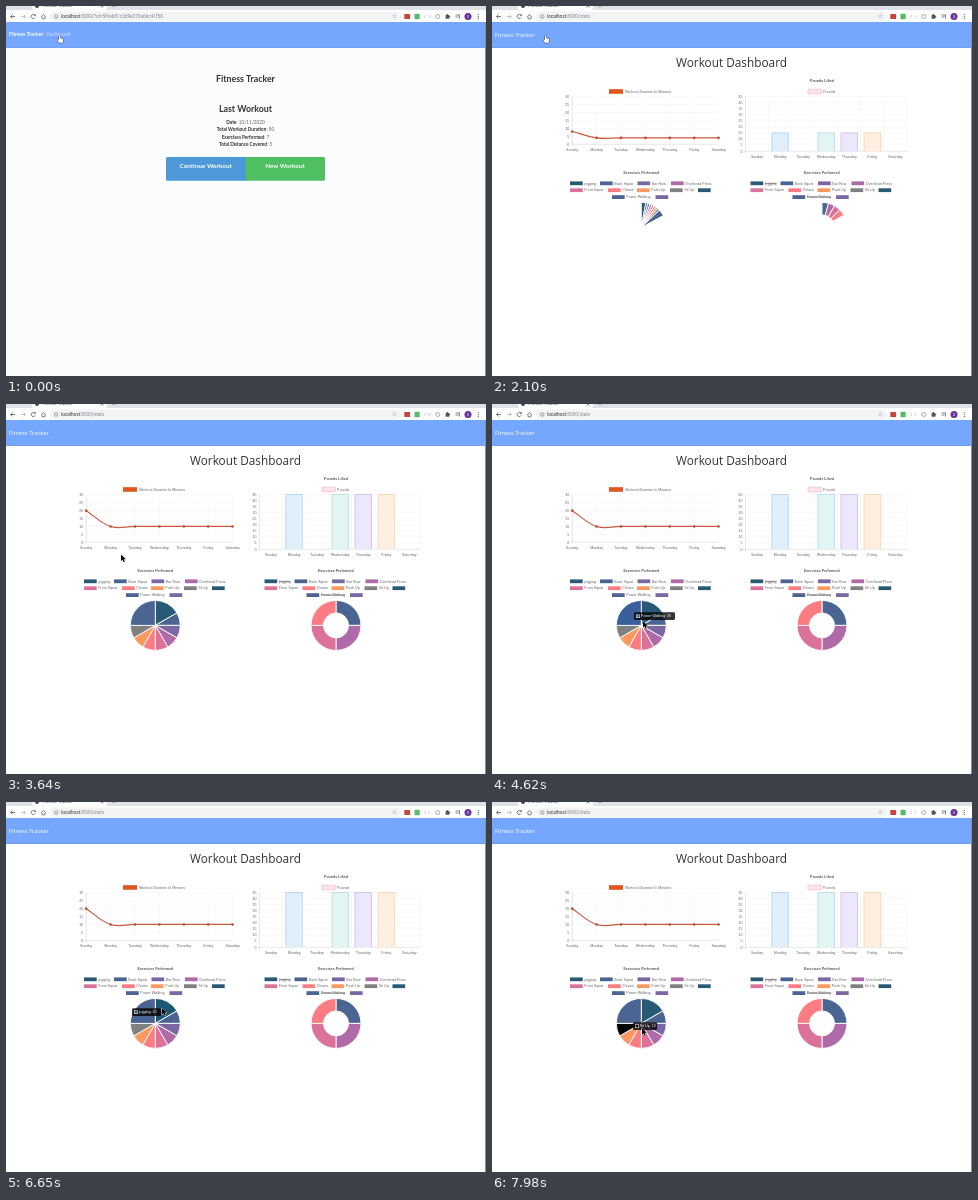
Recreate the animation shown at these times as an HTML page with a canvas. Size 480 by 370 pixels, loop 8 s.

```html
<!DOCTYPE html>
<html lang="en">
<head>
<meta charset="utf-8">
<title>Workout Dashboard</title>
<style>
  html, body { margin: 0; width: 100%; height: 100%; overflow: hidden; background: #fff; }
  canvas { display: block; width: 480px; height: 370px; }
</style>
</head>
<body>
<canvas id="stage" width="480" height="370"></canvas>
<script>
const ctx = document.getElementById('stage').getContext('2d');
const LOOP = 8000, DASHBOARD_AT = 2100, TAU = Math.PI * 2;
const LATO = 'Lato, sans-serif', SANS = '"Liberation Sans", Arial, sans-serif';
const OPEN = '"Open Sans", sans-serif', ROBOTO = 'Roboto, sans-serif';
const DAYS = ['Sunday', 'Monday', 'Tuesday', 'Wednesday', 'Thursday', 'Friday', 'Saturday'];
const [TEAL, BLUE, PURPLE, MAUVE, PINK, SALMON, ORANGE, GRAY] =
  ['#285a76', '#4b6592', '#7a67a3', '#af6ba8', '#dc7199', '#fb7d83', '#fd985f', '#808080'];

// Legend entries: label, colour, x, row
const LEGEND = [
  ['jogging', TEAL, 78, 0], ['Back Squat', BLUE, 108, 0], ['Bar Row', PURPLE, 145.5, 0],
  ['Overhead Press', MAUVE, 179, 0], ['Front Squat', PINK, 78, 1], ['Cleans', SALMON, 116, 1],
  ['Push Up', ORANGE, 145, 1], ['Sit Up', GRAY, 178, 1], ['', TEAL, 206, 1],
  ['Power Walking', BLUE, 120, 2], ['', PURPLE, 163.5, 2],
];
const PIE = [
  ['jogging', 20, TEAL, '#1d5873'], ['Back Squat', 10, BLUE], ['Bar Row', 10, PURPLE],
  ['Overhead Press', 10, MAUVE], ['Front Squat', 10, PINK], ['Cleans', 10, SALMON],
  ['Push Up', 10, ORANGE], ['Sit Up', 10, GRAY, '#000'], ['Power Walking', 30, BLUE, '#3b5f9b'],
];
const RING = [BLUE, MAUVE, PINK, SALMON].map(c => ['', 1, c]);
const BARS = [
  [1, '#dfeefb', '#9fcdf0'], [3, '#e1f3f5', '#a6dadb'],
  [4, '#ece5fb', '#c5b3ef'], [5, '#feeede', '#fbcd9d'],
];
// Pointer path: time, x, y
const POINTER = [
  [0, 54, 29], [2870, 54, 29], [3290, 95, 110], [4200, 147, 215], [4620, 151, 217],
  [4800, 151, 217], [5100, 156, 206], [6900, 156, 206], [7270, 146, 221],
  [7420, 146, 221], [7720, 150, 226], [8000, 150, 226],
];
// Hovered pie slice and where its tooltip rests: time, slice, x, y, width
const HOVERS = [
  [4200, 8, 142, 208.3, 41], [4900, 0, 126, 206.3, 29],
  [7278, 8, 142, 208.3, 41], [7700, 7, 141, 220.3, 24],
];

const lerp = (a, b, p) => a + (b - a) * p;
const easeOut = (t, start, length = 1000) =>
  1 - (1 - Math.min(1, Math.max(0, (t - start) / length))) ** 4;

function text(str, x, y, size, color, family = SANS, align = 'left', weight = 400) {
  ctx.font = `${weight} ${size}px ${family}`;
  ctx.textAlign = align;
  ctx.fillStyle = color;
  ctx.fillText(str, x, y + size * 0.35);
  return ctx.measureText(str).width;
}
function rect(x, y, w, h, color, radius = 0) {
  ctx.fillStyle = color;
  ctx.beginPath();
  ctx.roundRect(x, y, w, h, radius);
  ctx.fill();
}
function dot(x, y, r, color) {
  ctx.fillStyle = color;
  ctx.beginPath();
  ctx.arc(x, y, r, 0, TAU);
  ctx.fill();
}
function stroke(path, color, width = 0.8) {
  ctx.strokeStyle = color;
  ctx.lineWidth = width;
  ctx.stroke(new Path2D(path));
}

function drawBrowser(home) {
  rect(0, 0, 480, 4, '#dee1e6');
  rect(0, 4, 480, 12, '#fff');
  rect(26, -4, 75, 8, '#fff', 2);
  dot(31, 0, 2, '#444');
  text('Fitness Tracker', 36, -0.4, 4.5, '#555', ROBOTO);
  stroke('M94.5 -1.5l3 3M97.5 -1.5l-3 3M106 0h4', '#666', 0.7);

  stroke('M9 10.5h-4.4m2-2l-2 2l2 2', '#555');
  stroke('M15 10.5h4.4m-2-2l2 2l-2 2', '#b5b5b5');
  stroke('M29 9.3a2.1 2.1 0 1 0 .2 2M29.4 8v1.6h-1.6', '#666');
  stroke('M35.2 10.7l2.3-2.4l2.3 2.4M36 10.3v2.5h3v-2.5', '#666');
  rect(44, 5.5, 351, 10, '#f1f3f4', 5);
  stroke('M52 10.5a1.8 1.8 0 1 0 -3.6 0a1.8 1.8 0 1 0 3.6 0M50.2 10.3v1.2', '#777', 0.6);
  const host = text('localhost', 55, 10.5, 4.7, '#333', ROBOTO);
  text(home ? ':8000/?id=5f4ab81c2d9e370a6bc41f58' : ':8000/stats', 55 + host, 10.5, 4.7, '#85888c', ROBOTO);

  text('☆', 388.5, 10.5, 5.5, '#666', '"DejaVu Sans", sans-serif', 'center');
  rect(398.3, 8, 5.8, 5, '#c8453f', 0.6);
  rect(408.5, 7.8, 5.2, 5.4, '#58ba6a', 0.6);
  stroke('M420 9l-1.5 1.5l1.5 1.5M422.5 9l1.5 1.5l-1.5 1.5', '#aaa', 0.6);
  stroke('M433.7 10.5a2 2 0 1 0 -4 0a2 2 0 1 0 4 0', '#888', 0.7);
  rect(439.6, 9, 3.7, 3.7, '#555', 0.5);
  dot(441.4, 8.8, 0.9, '#555');
  dot(443.5, 10.8, 0.8, '#555');
  stroke('M449.5 9h4.5M449.5 11h3M453.5 9v3.5', '#666', 0.8);
  dot(462, 10.5, 3.5, '#68339a');
  text('S', 462, 10.5, 3.5, '#fff', ROBOTO, 'center');
  [8.6, 10.5, 12.4].forEach(y => dot(472.3, y, 0.6, '#555'));

  rect(0, 16, 480, 26, '#76a7ff');
  rect(0, 41, 480, 1, '#709fee');
  rect(479, 16, 1, 354, '#8d9095');
}

function drawHome() {
  const ink = '#333';
  text('Fitness Tracker', 3, 27.8, 5.15, '#fff', LATO, 'left', 700);
  text('Dashboard', 40, 27.8, 5.1, '#d3e2ff', LATO);
  text('Fitness Tracker', 239.5, 73, 8.8, ink, LATO, 'center', 700);
  text('Last Workout', 239.5, 103, 8.8, ink, LATO, 'center', 700);
  [['Date', '10/11/2020'], ['Total Workout Duration', '80'],
   ['Exercises Performed', '7'], ['Total Distance Covered', '5']].forEach(([label, value], i) => {
    const size = 4.7, y = 116 + i * 7.6;
    ctx.font = `700 ${size}px ${LATO}`;
    const labelWidth = ctx.measureText(label).width;
    ctx.font = `400 ${size}px ${LATO}`;
    const x = 239.5 - (labelWidth + ctx.measureText(': ' + value).width) / 2;
    text(label, x, y, size, ink, LATO, 'left', 700);
    text(': ' + value, x + labelWidth, y, size, '#666', LATO);
  });
  rect(160, 151, 80, 23.7, '#4c98d9', [1.5, 0, 0, 1.5]);
  rect(239.5, 151, 79.5, 23.7, '#4fbf61', [0, 1.5, 1.5, 0]);
  text('Continue Workout', 199.7, 159.7, 6.3, '#fff', LATO, 'center', 700);
  text('New Workout', 279, 159.7, 6.3, '#fff', LATO, 'center', 700);
}

function drawAxes(left, right, top, bottom, max, xs) {
  for (let v = 0; v <= max; v += 5) {
    const y = lerp(bottom, top, v / max);
    stroke(`M${left - 2} ${y}H${right}`, v ? '#f5f5f5' : '#d8d8d8', 0.6);
    text(v, left - 3, y, 3.6, '#666', SANS, 'right');
  }
  xs.forEach((x, i) => text(DAYS[i], x, bottom + 5.5, 3.6, '#666', SANS, 'center'));
  stroke(`M${left} ${top}V${bottom + 2}`, '#d8d8d8', 0.6);
}

function drawLineChart(p) {
  const xs = DAYS.map((_, i) => 80.2 + i * 24.4);
  xs.forEach(x => stroke(`M${x} 90.8V138.3`, '#f5f5f5', 0.6));
  drawAxes(80.2, 226.6, 90.8, 138.3, 30, xs);
  rect(117, 83.2, 14, 4.6, '#e0561f');
  text('Workout Duration In Minutes', 133, 85.5, 3.65, '#666');
  const points = xs.map((x, i) => [x, 138.3 - (i ? 10 : 20) * p * 47.5 / 30]);
  const controls = points.map((pt, i) => {
    const a = points[i - 1] || pt, b = points[i + 1] || pt;
    const before = Math.hypot(pt[0] - a[0], pt[1] - a[1]);
    const after = Math.hypot(b[0] - pt[0], b[1] - pt[1]);
    const shift = d => [pt[0] + d * (b[0] - a[0]), pt[1] + d * (b[1] - a[1])];
    const k = 0.4 / (before + after);
    return [shift(-k * before), shift(k * after)];
  });
  let path = `M${points[0]}`;
  for (let i = 1; i < 7; i++) path += `C${controls[i - 1][1]} ${controls[i][0]} ${points[i]}`;
  stroke(path, '#c65b43', 1.2);
  points.forEach(([x, y]) => dot(x, y, 1.3, '#bd4d35'));
}

function drawBarChart(p) {
  const xs = DAYS.map((_, i) => 265 + i * 23.05);
  xs.forEach(x => stroke(`M${x + 11.5} 90.5V145.3`, '#f5f5f5', 0.6));
  drawAxes(253.5, 415, 90.5, 145.3, 45, xs);
  text('Pounds Lifted', 330, 74.7, 3.6, '#555', SANS, 'center', 700);
  rect(316, 83.2, 13.3, 4.6, '#fbe5ea');
  stroke('M316 83.2h13.3v4.6h-13.3z', '#f1b3c2', 0.6);
  text('Pounds', 331, 85.5, 3.65, '#666');
  BARS.forEach(([day, fill, edge]) => {
    const x = xs[day] - 8.2, h = 54.8 * p;
    ctx.globalAlpha = 0.92;
    rect(x, 145.3 - h, 16.5, h, fill);
    ctx.globalAlpha = 1;
    stroke(`M${x} 145.3v${-h}h16.5v${h}`, edge, 0.7);
  });
}

function drawLegend(dx, hidden) {
  text('Exercises Performed', 149.3 + dx, 166.7, 3.6, '#555', SANS, 'center', 700);
  LEGEND.forEach(([label, color, x, row]) => {
    const y = 177.3 + row * 6.9;
    rect(x + dx, y - 1.9, 12.7, 3.8, color);
    const w = text(label, x + dx + 14.3, y, 3.65, '#666');
    if (hidden.includes(label)) stroke(`M${x + dx + 14.3} ${y}h${w}`, '#555', 0.6);
  });
}

function drawSlices(slices, cx, inner, p, hovered = -1) {
  const cy = 221.4, total = slices.reduce((sum, s) => sum + s[1], 0);
  let start = -TAU / 4;
  slices.forEach(([, value, color, hoverColor], i) => {
    const end = start + value / total * TAU * p;
    ctx.beginPath();
    ctx.arc(cx, cy, 25, start, end);
    ctx.arc(cx, cy, inner, end, start, true);
    ctx.closePath();
    ctx.fillStyle = i === hovered ? hoverColor : color;
    ctx.fill();
    ctx.strokeStyle = '#fff';
    ctx.lineWidth = 0.9;
    ctx.stroke();
    start = end;
  });
}

function drawTooltip(t, index) {
  const [since, slice, ...rest] = HOVERS[index];
  const from = index ? HOVERS[index - 1].slice(2) : rest;
  const p = easeOut(t, since, 400);
  const [x, y, w] = rest.map((v, i) => lerp(from[i], v, p));
  const [label, value, color] = PIE[slice];
  ctx.save();
  ctx.globalAlpha = index ? 1 : p;
  rect(x, y, w, 7.8, 'rgba(0,0,0,.8)', 1.4);
  ctx.clip();
  rect(x + 2, y + 2.1, 3.7, 3.7, '#fff');
  rect(x + 2.5, y + 2.6, 2.7, 2.7, slice === 7 ? '#000' : color);
  text(`${label}: ${value}`, x + 6.8, y + 3.9, 3.65, '#fff');
  ctx.restore();
}

function drawPointer(t) {
  const i = POINTER.findIndex(k => k[0] > t), a = POINTER[i - 1], b = POINTER[i];
  const p = (t - a[0]) / (b[0] - a[0]);
  const x = lerp(a[1], b[1], p), y = lerp(a[2], b[2], p);
  const hand = y < 42;
  const shape = new Path2D(hand
    ? 'M-1 .8q.7-1 1.3 0v2.5l2.4.7q.8.3.6 1.2l-.6 2.6h-3.6l-2-3q.2-1 1.9.3z'
    : 'M0 0v6.6l1.5-1.4l1.1 2.5l1.2-.5l-1.1-2.4h2.1z');
  ctx.save();
  ctx.translate(x, y);
  ctx.lineWidth = 0.8;
  ctx.strokeStyle = hand ? '#222' : '#fff';
  ctx.fillStyle = hand ? '#fff' : '#000';
  ctx.stroke(shape);
  ctx.fill(shape);
  ctx.restore();
}

function drawDashboard(t) {
  text('Fitness Tracker', 3, 28.7, 5.75, '#fff', OPEN);
  text('Workout Dashboard', 239.5, 56.6, 11.8, '#333', OPEN, 'center');
  drawLineChart(easeOut(t, 1980));
  drawBarChart(easeOut(t, 2004));
  drawLegend(0, []);
  drawLegend(180.5, ['jogging', 'Power Walking']);
  const hover = HOVERS.filter(h => h[0] <= t).length - 1;
  drawSlices(PIE, 149.3, 0, easeOut(t, 2055), hover < 0 ? -1 : HOVERS[hover][1]);
  drawSlices(RING, 330, 12.5, easeOut(t, 2052, 1090));
  if (hover >= 0) drawTooltip(t, hover);
}

function frame() {
  const t = performance.now() % LOOP, home = t < DASHBOARD_AT;
  rect(0, 0, 480, 370, home ? '#fbfcfe' : '#fff');
  drawBrowser(home);
  if (home) drawHome();
  else drawDashboard(t);
  drawPointer(t);
  requestAnimationFrame(frame);
}
frame();
</script>
</body>
</html>
```
